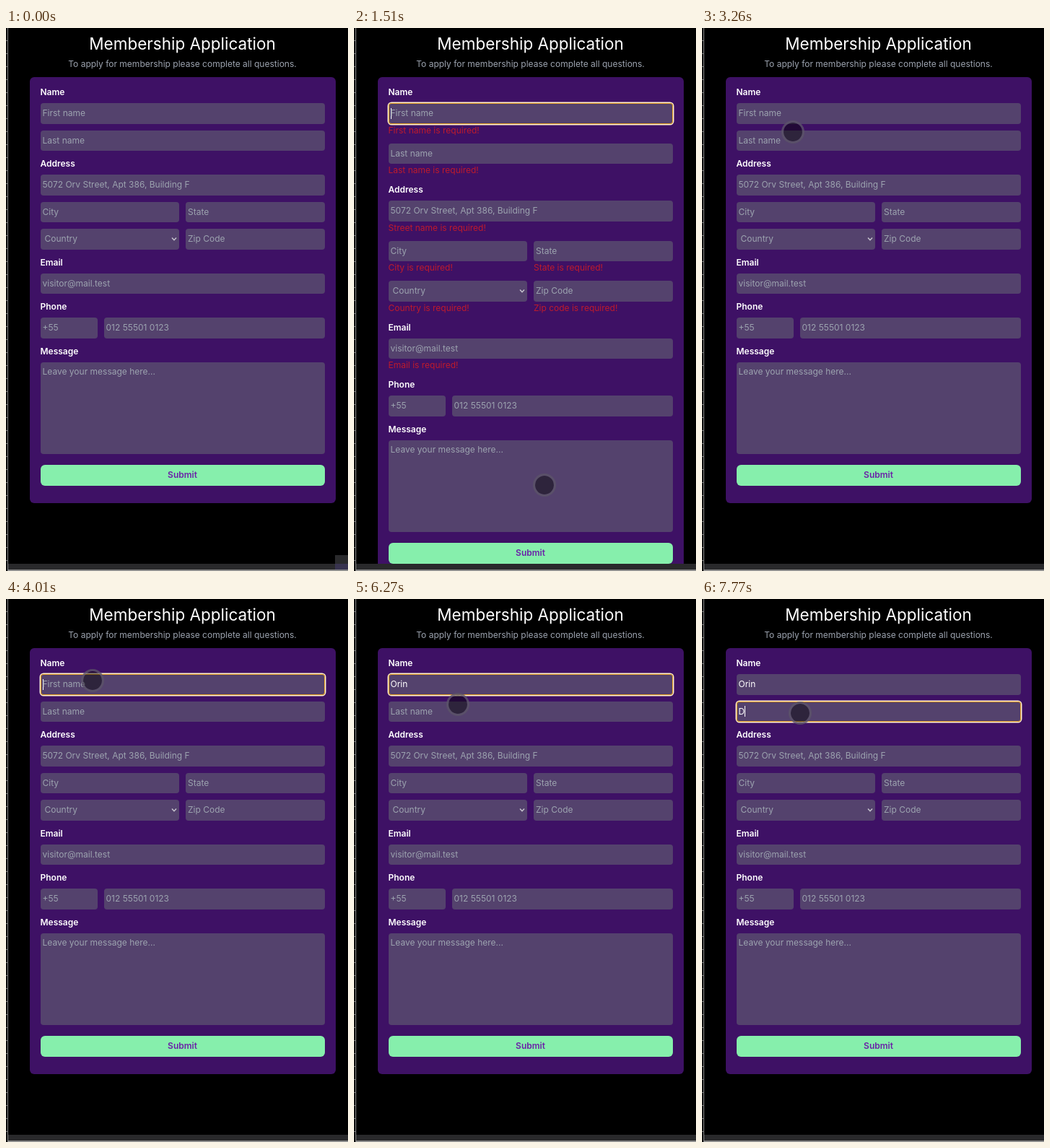
An HTML page for the animation above (8 s loop, 474x752 px).

```html
<!DOCTYPE html>
<html lang="en">
<head>
<meta charset="utf-8">
<title>Membership Application</title>
<style>
  * { box-sizing: border-box; }
  html, body { margin: 0; width: 100%; height: 100%; overflow: hidden; background: #000; }
  body { font: 12px/18px Inter, sans-serif; font-optical-sizing: none; color: #fff; }
  #stage { position: relative; width: 474px; height: 752px; overflow: hidden; background: #000; }
  #stage > * { position: absolute; }
  h1, .intro { left: 0; width: 489px; margin: 0; text-align: center; white-space: nowrap; }
  h1 { top: 7px; font-size: 22.5px; line-height: 30px; font-weight: 400; }
  .intro { top: 41px; color: #9ca3af; }

  .panel { left: 32.5px; top: 68px; width: 424px; padding: 12px 15px 24px; border-radius: 6px; background: #3e1165; }
  .label { height: 18px; margin-bottom: 6px; font-weight: 600; }
  .row { display: flex; gap: 9px; margin-bottom: 9px; }
  .cell { flex: 1; }
  .code { flex: 0 0 79px; }
  .field { position: relative; display: flex; align-items: center; height: 28.5px; padding: 0 3px;
           border-radius: 4px; background: #54426d; white-space: pre; }
  .hint { color: #9ca3af; }
  .select { padding-left: 6px; }
  .select svg { position: absolute; right: 3px; top: 11px; }
  .area { height: 127.5px; align-items: flex-start; padding-top: 4px; }
  .error { display: none; height: 18px; color: #be1b2c; white-space: nowrap; }
  .invalid .error { display: block; }
  .focus { box-shadow: inset 0 0 0 1px #d8921f, 0 0 0 1.5px #fff0cf; }
  .caret { width: 1px; height: 15px; margin-right: -1px; background: #fff; visibility: hidden; }
  .submit { height: 28.5px; margin-top: 15px; border-radius: 6px; background: #86efac; color: #6b21a8;
            font-weight: 600; line-height: 28.5px; text-align: center; }

  .ruler { left: 0; top: 0; width: 3px; height: 752px; border-right: 1px solid #8a8a8a;
           background: repeating-linear-gradient(#000 0 17px, #777 17px 18px); }
  .bar { left: 3px; top: 742px; width: 471px; height: 10px; background: #29292b; border-bottom: 2px solid #8c8c8c; }
  #corner { left: 456px; top: 730px; width: 18px; height: 20px; background: linear-gradient(#2a2a2c 12px, #38334f 12px); }
  #ring, #arrow { left: 0; top: 0; }
  #ring { width: 32px; height: 32px; margin: -16px; border: 3px solid rgba(92, 84, 104, .8); border-radius: 50%;
          background: rgba(0, 0, 0, .45); background-clip: padding-box; }
</style>
</head>
<body>
<div id="stage">
  <h1>Membership Application</h1>
  <div class="intro">To apply for membership please complete all questions.</div>
  <div class="panel" id="panel"></div>
  <div class="ruler"></div>
  <div class="bar"></div>
  <div id="corner"></div>
  <div id="ring"></div>
  <svg id="arrow" width="22" height="30" overflow="visible">
    <path d="M.5 .5V23.5L6 18.5L10 27.5L14 25.7L10.2 17H18Z" fill="#fff" stroke="#111"/>
  </svg>
</div>
<script>
const $ = id => document.getElementById(id);
const label = text => `<div class="label">${text}</div>`;
const row = (...cells) => `<div class="row">${cells.join('')}</div>`;
const cell = (hint, { id = '', kind = '', error, extra = '', size = '' } = {}) => `
  <div class="cell ${size}">
    <div class="field ${kind}" id="${id}"><span class="typed"></span><i class="caret"></i><span class="hint">${hint}</span>${extra}</div>
    ${error ? `<div class="error">${error} is required!</div>` : ''}
  </div>`;
const chevron = '<svg width="8" height="7"><path d="M1 1.5L4 4.7L7 1.5" fill="none" stroke="#c8c6d0" stroke-width="1.4"/></svg>';

$('panel').innerHTML = [
  label('Name'),
  row(cell('First name', { id: 'first', error: 'First name' })),
  row(cell('Last name', { id: 'last', error: 'Last name' })),
  label('Address'),
  row(cell('5072 Orv Street, Apt 386, Building F', { error: 'Street name' })),
  row(cell('City', { error: 'City' }), cell('State', { error: 'State' })),
  row(cell('Country', { kind: 'select', error: 'Country', extra: chevron }), cell('Zip Code', { error: 'Zip code' })),
  label('Email'),
  row(cell('visitor@mail.test', { error: 'Email' })),
  label('Phone'),
  row(cell('+55', { size: 'code' }), cell('012 55501 0123')),
  label('Message'),
  row(cell('Leave your message here...', { kind: 'area' })),
  '<div class="submit">Submit</div>'
].join('');

const LOOP = 8000;

// Each track lists [start time, value...]; values hold until the next entry.
const pointer = [
  [0, '', 0, 0], [250, 'arrow', 440, 668], [500, 'ring', 345, 562], [760, 'ring', 298, 544],
  [1010, 'ring', 266, 616], [1250, 'ring', 265, 633], [1510, 'ring', 264, 633],
  [3000, 'arrow', 109, 75], [3260, 'ring', 126, 144], [3760, 'ring', 120, 112], [4010, 'ring', 120, 113],
  [5260, 'ring', 236, 154], [5510, 'arrow', 444, 214], [5770, 'arrow', 452, 230],
  [6020, 'ring', 250, 178], [6270, 'ring', 144, 146], [6520, 'ring', 140, 157],
  [6770, 'ring', 136, 160], [7020, 'ring', 136, 158]
];
const focus = [[0, ''], [1510, 'first'], [3260, ''], [3760, 'first'], [6520, 'last']];
const caret = [
  [0, false], [1510, true], [2010, false], [2510, true], [3000, false], [3760, true],
  [5260, false], [5770, true], [6270, false], [6520, true], [7020, false], [7520, true]
];
const typed = {
  first: [[0, ''], [4510, 'Or'], [4760, 'Orin']],
  last: [[0, ''], [7770, 'D']]
};
const at = (track, t) => track.findLast(step => step[0] <= t).slice(1);

function draw(t) {
  const [kind, x, y] = at(pointer, t);
  for (const id of ['ring', 'arrow']) {
    $(id).style.display = id === kind ? 'block' : 'none';
    $(id).style.transform = `translate(${x}px, ${y}px)`;
  }
  $('corner').hidden = t >= 250;
  $('panel').classList.toggle('invalid', t >= 1510 && t < 3260);

  const [active] = at(focus, t), [blink] = at(caret, t);
  for (const id in typed) {
    const field = $(id), [text] = at(typed[id], t);
    field.classList.toggle('focus', id === active);
    field.querySelector('.typed').textContent = text;
    field.querySelector('.hint').hidden = text !== '';
    field.querySelector('.caret').style.visibility = id === active && blink ? 'visible' : 'hidden';
  }
}

const start = performance.now();
function tick(now) {
  draw(Math.max(0, now - start) % LOOP);
  requestAnimationFrame(tick);
}
draw(0);
requestAnimationFrame(tick);
</script>
</body>
</html>
```
